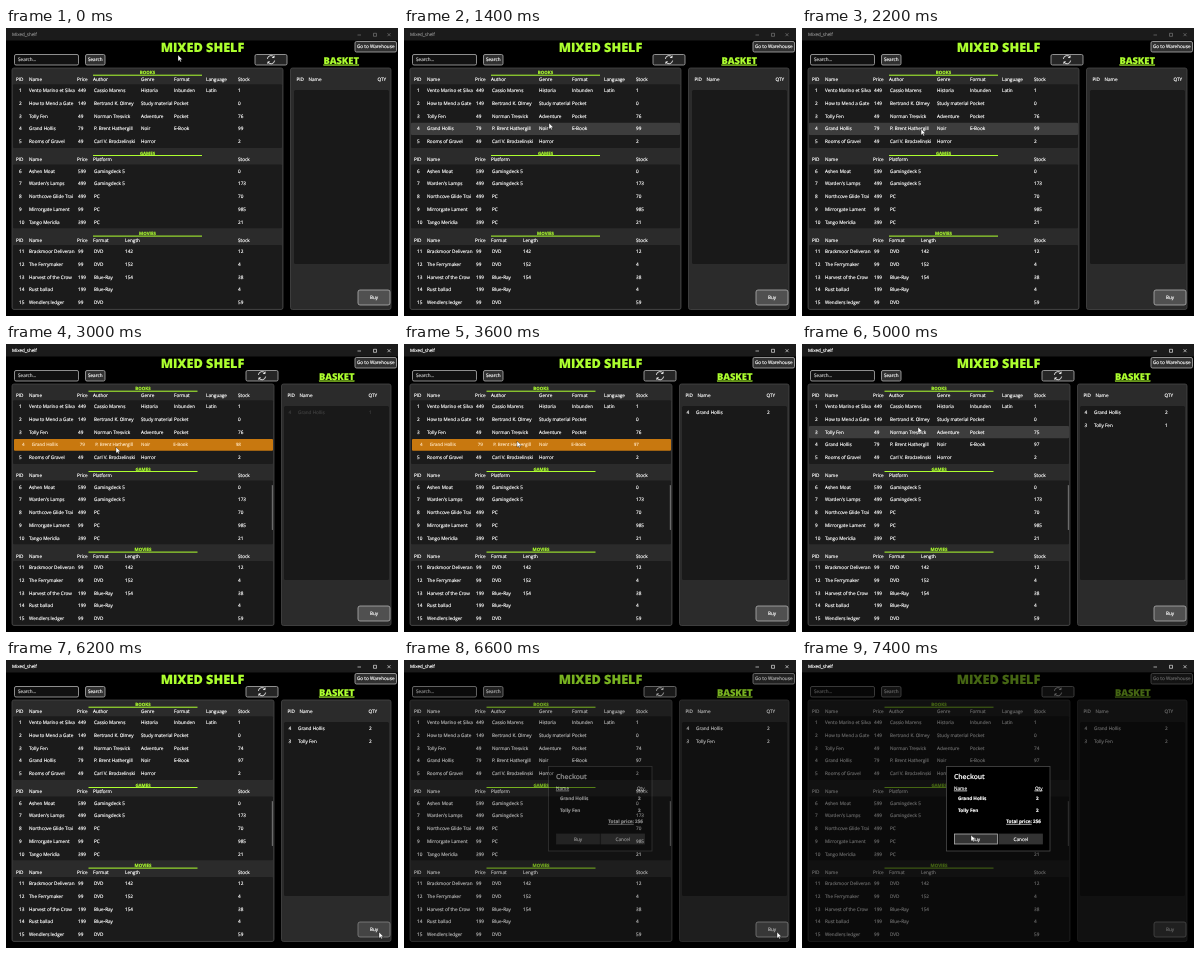
Recreate the animation shown at these times as an HTML page. Size 392 by 288 pixels, loop 8 s.

```html
<!DOCTYPE html>
<html lang="en">
<head>
<meta charset="utf-8">
<title>Mixed_shelf</title>
<style>
html, body { margin: 0; width: 100%; height: 100%; overflow: hidden; background: #000; }
svg { display: block; width: 392px; height: 288px; font-family: "Open Sans", "Noto Sans", sans-serif; text-rendering: geometricPrecision; }
text { stroke-width: .16px; }
</style>
</head>
<body>
<svg id="stage" viewBox="0 0 392 288"></svg>
<script>
const LOOP = 8000, STEP = 200, ROW = 12.75, SIZE = 4.65;
const GREEN = '#adff2f', EDGE = '#b0b0b0', PANEL_EDGE = '#484848';

const sections = [
  { title: 'BOOKS', y: 39, columns: { 87: 'Author', 135: 'Genre', 168: 'Format', 200: 'Language' }, rows: [
    ['Vento Marino et Silva', 449, 1, 'Cassio Marens', 'Historia', 'Inbunden', 'Latin'],
    ['How to Mend a Gate', 149, 0, 'Bertrand K. Olmey', 'Study material', 'Pocket'],
    ['Tolly Fen', 49, 76, 'Norman Tresvick', 'Adventure', 'Pocket'],
    ['Grand Hollis', 79, 99, 'P. Brent Hathergill', 'Noir', 'E-Book'],
    ['Rooms of Gravel', 49, 2, 'Carl V. Brodzelinski', 'Horror']] },
  { title: 'GAMES', y: 119.3, columns: { 87: 'Platform' }, rows: [
    ['Ashen Moat', 599, 0, 'Gamingdeck 5'],
    ["Warden's Lamps", 499, 173, 'Gamingdeck 5'],
    ['Northcove Glide Trai', 499, 70, 'PC'],
    ['Mirrorgate Lament', 99, 985, 'PC'],
    ['Tango Meridia', 399, 21, 'PC']] },
  { title: 'MOVIES', y: 199.9, columns: { 87: 'Format', 119: 'Length' }, rows: [
    ['Brackmoor Deliveran', 99, 12, 'DVD', 142],
    ['The Ferrymaker', 99, 4, 'DVD', 152],
    ['Harvest of the Crow', 199, 38, 'Blue-Ray', 154],
    ['Rust ballad', 199, 4, 'Blue-Ray'],
    ['Wendlers ledger', 99, 59, 'DVD']] }
];

// Clicks that add a product to the basket
const orders = [
  { pid: 4, name: 'Grand Hollis', clicks: [2800, 3600] },
  { pid: 3, name: 'Tolly Fen', clicks: [4600, 5200] }
];

// time, x, y of the pointer tip
const path = [
  [200, 172, 27], [1200, 145, 95], [1400, 145, 95], [2600, 110, 103], [3000, 110, 103],
  [3600, 113, 97], [4200, 113, 97], [4600, 116, 83], [5200, 116, 83],
  [6000, 373, 272], [6600, 373, 272], [7200, 171, 176], [7400, 169, 175]
];

const clamp = v => Math.max(0, Math.min(1, v));
const ease = v => v * v * (3 - 2 * v);

function pointerAt(t) {
  const next = path.findIndex(p => p[0] > t);
  if (next < 0) return path[path.length - 1].slice(1);
  if (next === 0) return path[0].slice(1);
  const a = path[next - 1], b = path[next], k = ease((t - a[0]) / (b[0] - a[0]));
  return [1, 2].map(i => a[i] + (b[i] - a[i]) * k);
}

const box = (x, y, w, h, fill, r = 0, stroke = 'none', sw = .8) =>
  `<rect x="${x}" y="${y}" width="${w}" height="${h}" rx="${r}" fill="${fill}" stroke="${stroke}" stroke-width="${sw}"/>`;

// y is the middle of the line of text
const text = (x, y, s, { size = SIZE, fill = '#fff', weight = 400, anchor = 'start', line = 0 } = {}) =>
  `<text x="${x}" y="${y + size * .36}" font-size="${size}" fill="${fill}" stroke="${fill}" font-weight="${weight}" text-anchor="${anchor}"${line ? ' text-decoration="underline"' : ''}>${s ?? ''}</text>`;

const button = (x, y, w, h, label, fill = '#303030', stroke = EDGE, r = 1.5) =>
  box(x, y, w, h, fill, r, stroke) + text(x + w / 2, y + h / 2, label, { anchor: 'middle' });

const sold = (pid, t) => {
  const order = orders.find(o => o.pid === pid);
  return order ? order.clicks.filter(c => c <= t).length : 0;
};

function titleBar(active) {
  const ink = active ? '#fff' : '#858585';
  return box(0, 0, 392, 12.5, '#1b1b1b') + text(6, 6.5, 'Mixed_shelf', { fill: ink, size: 4.5 }) +
    `<path d="M351.500 7h3.500M367.500 5.300h3v3h-3zM381.500 5.200l3 3m0-3l-3 3" fill="none" stroke="${ink}" stroke-width=".6"/>`;
}

function toolbar(right) {
  return box(8.5, 26.5, 64, 10.5, '#111', 1.5, EDGE) + text(12, 31.5, 'Search...', { fill: '#ccc' }) +
    button(79.5, 26.5, 19.5, 10.5, 'Search') +
    text(196.5, 19.4, 'MIXED SHELF', { size: 12.7, weight: 800, fill: GREEN, anchor: 'middle' }) +
    button(349, 13.5, 41.5, 10.5, 'Go to Warehouse') +
    box(right - 28, 26.5, 32, 10.5, '#252525', 1.5, EDGE) +
    `<path transform="translate(${right - 12} 31.700) scale(1.200)" d="M-3-.7a3 3 0 0 1 5.600-1.200v-1.600m0 1.700h-1.700M3 .7a3 3 0 0 1-5.600 1.200v1.600m0-1.700h1.700" fill="none" stroke="#fff" stroke-width=".7"/>`;
}

function productRow(row, pid, y, xs, right, state, t) {
  const [name, price, stock, ...details] = row, mid = y + ROW / 2;
  const fill = state === 'pressed' ? '#ffe3bd' : '#fff';
  const put = (x, s) => text(x, mid, s, { fill });
  const cells = put(13, pid) + put(23, name) + put(72, price) + put(232, stock - sold(pid, t)) +
    details.map((s, i) => put(+xs[i] + (i ? 0 : 1), s)).join('');
  if (state === 'pressed') {
    const c = (6 + right) / 2;
    return box(8, y + .5, right - 9, 11.8, '#c8780f', 1) +
      `<g transform="translate(${c} ${mid}) scale(.975) translate(${-c} ${-mid})">${cells}</g>`;
  }
  return (state === 'hover' ? box(7, y + .3, right - 8, 12.2, '#3d3d3d', 1) : '') + cells;
}

function products(right, t, [px, py], active) {
  const mid = (6 + right) / 2, modal = t >= 6400;
  let out = box(6, 40, right - 6, 241.5, '#2b2b2b', 2, PANEL_EDGE);
  sections.forEach(({ title, y, columns, rows }, s) => {
    const xs = Object.keys(columns), top = y + 17.2;
    out += text(mid, y + 5.9, title, { size: 4.4, weight: 700, fill: GREEN, anchor: 'middle' }) +
      box(mid - 54.5, y + 7.7, 109, 1, GREEN) +
      Object.entries({ 10: 'PID', 23: 'Name', 71: 'Price', 232: 'Stock', ...columns })
        .map(([x, s]) => text(x, y + 12.3, s)).join('') +
      box(7, top, right - 8, ROW * 5, '#1b1b1b', 1);
    rows.forEach((row, i) => {
      const rowY = top + i * ROW, pid = s * 5 + i + 1;
      const hovered = !modal && px > 7 && px < right && py >= rowY && py < rowY + ROW;
      const order = orders.find(o => o.pid === pid);
      const pressed = order && order.clicks.some((c, n) => t >= c && t <= c + (c === 2800 ? 200 : 0));
      out += productRow(row, pid, rowY, xs, right, pressed ? 'pressed' : hovered ? 'hover' : '', t);
    });
  });
  return out + (active ? box(265.8, 141, 1.2, 45, '#6a6a6a', .6) : '');
}

function basket(left, t, active, [px, py]) {
  const over = px > 352 && py > 262 && t < 6600;
  const listX = active ? 278 : 288;
  const items = orders.map((o, i) => {
    const y = 68.3 + i * 12.6, shown = clamp((t - o.clicks[0] - 100) / 300);
    const alpha = t < o.clicks[0] + 200 ? 0 : Math.pow(shown, 1.7);
    return `<g opacity="${alpha}">` + text(left + 7, y, o.pid) + text(left + 16.5, y, o.name) +
      text(left + 87.5, y, sold(o.pid, t)) + '</g>';
  }).join('');
  return text((left + 386) / 2, 32.2, 'BASKET', { size: 9.4, weight: 800, fill: GREEN, anchor: 'middle', line: 1 }) +
    box(left, 40, 385 - left, 241.5, '#2b2b2b', 2, PANEL_EDGE) +
    text(left + 6, 51, 'PID') + text(left + 18, 51, 'Name') + text(left + 87, 51, 'QTY') +
    box(listX, 62, 383 - listX, 174, '#191919', 1.5) + items +
    button(352, 262, 32, 15, 'Buy', over ? '#444' : '#505050', over ? '#858585' : EDGE, 2);
}

function checkout(t, [px, py]) {
  const alpha = clamp((t - 6400) / 400);
  if (!alpha) return '';
  const over = px > 152 && px < 195 && py > 174 && py < 184;
  const bold = { weight: 700 };
  return `<g opacity="${alpha}">` + box(0, 12.5, 392, 275.5, 'rgba(0,0,0,.6)') +
    box(144.5, 106.5, 103.5, 84.5, '#000', 0, '#4a4a4a') +
    text(152, 117, 'Checkout', { size: 6.8, weight: 600 }) +
    text(152, 128, 'Name', { line: 1 }) + text(240.5, 128, 'Qty', { anchor: 'end', line: 1 }) +
    orders.map((o, i) => text(156, 138 + i * 12.5, o.name, bold) + text(234, 138 + i * 12.5, 2, bold)).join('') +
    text(239, 161.3, '<tspan text-decoration="underline">Total price:</tspan> 256', { weight: 700, anchor: 'end' }) +
    button(152.5, 174, 43, 10, 'Buy', over ? '#333' : '#2b2b2b', over ? EDGE : '#2b2b2b', 0) +
    button(197, 174, 43.5, 10, 'Cancel', '#333', '#333', 0) + '</g>';
}

const pointer = ([x, y]) =>
  `<path transform="translate(${x} ${y})" d="M0 0V6.200L1.500 4.900 2.500 7 3.400 6.600 2.500 4.600H4.400Z" fill="#fff" stroke="#000" stroke-width=".35"/>`;

function scene(t) {
  const active = t >= 2800, right = active ? 268 : 277, left = active ? 275.5 : 284.5, tip = pointerAt(t);
  return titleBar(active) + toolbar(right) + products(right, t, tip, active) +
    basket(left, t, active, tip) + checkout(t, tip) + pointer(tip);
}

const stage = document.getElementById('stage');
let shown = -1;
function tick() {
  const t = Math.min(7400, Math.floor(performance.now() % LOOP / STEP) * STEP);
  if (t !== shown) stage.innerHTML = scene(shown = t);
  requestAnimationFrame(tick);
}
tick();
</script>
</body>
</html>
```
